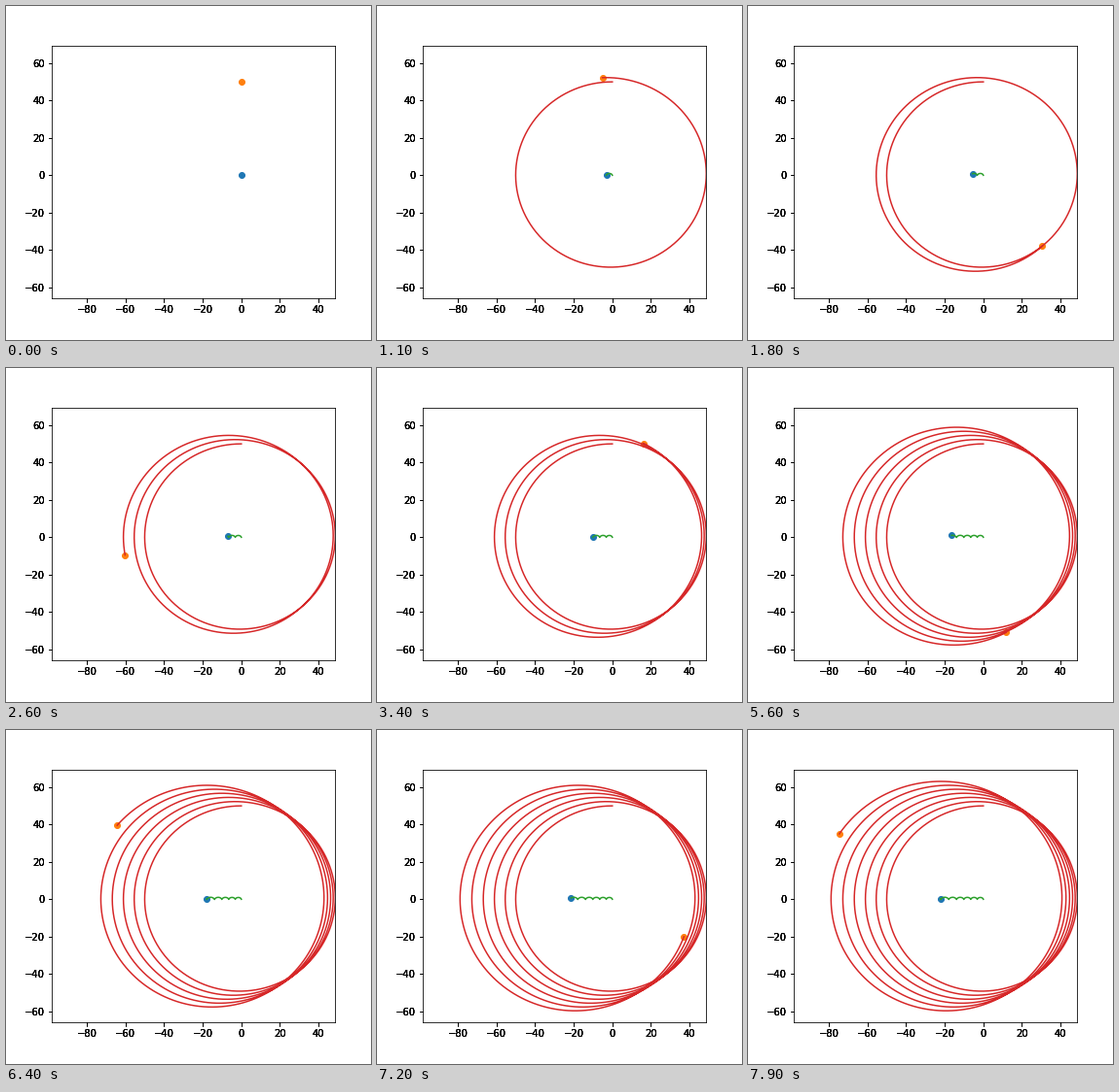
A matplotlib script that plays this animation: 375x344 px, repeating every 8000 ms.

```python
import matplotlib.pyplot as plt
import numpy as np
from matplotlib.animation import FuncAnimation

W, H, DPI = 375, 344, 72
FRAMES, INTERVAL = 80, 100

# Two bodies under gravity (G = 1), heavy one starting at rest
M, m, R = 1000.0, 10.0, 50.0
STEPS = 161              # integration steps per frame
DT = 6.524 / STEPS


def simulate(n):
    """Explicit Euler; its energy gain widens the orbit turn by turn."""
    pos = np.array([[0.0, 0.0], [0.0, R]])
    vel = np.array([[0.0, 0.0], [-np.sqrt(M / R), 0.0]])
    path = np.empty((n + 1, 2, 2))
    path[0] = pos
    for i in range(1, n + 1):
        d = pos[1] - pos[0]
        pull = d / (d @ d) ** 1.5
        acc = np.array([m * pull, -M * pull])
        pos = pos + vel * DT
        vel = vel + acc * DT
        path[i] = pos
    return path


path = simulate(STEPS * (FRAMES - 1))

plt.rcParams.update({"font.family": "DejaVu Sans", "font.size": 10})
fig = plt.figure(figsize=(W / DPI, H / DPI), dpi=DPI, facecolor="white")
BOX = [0.125, 0.125, 0.775, 0.755]


def make_axes(**kw):
    ax = fig.add_axes(BOX, **kw)
    ax.set_xlim(-98.3, 48.27)
    ax.set_ylim(-65.8, 69.15)
    ax.set_xticks(range(-80, 41, 20))
    ax.set_yticks(range(-60, 61, 20))
    return ax


ax = make_axes()
# Stacked copies of the tick labels give them their heavy look
for k in range(3):
    make_axes(frameon=False, label=f"labels{k}")

dots = [ax.plot([], [], "o", color=c, ms=6)[0] for c in ("C0", "C1")]
trails = [ax.plot([], [], color=c, lw=1.5)[0] for c in ("C2", "C3")]


def update(frame):
    end = frame * STEPS
    for b in range(2):
        dots[b].set_data(path[end:end + 1, b, 0], path[end:end + 1, b, 1])
        part = path[:end + 1:7, b] if frame else path[:0, b]
        trails[b].set_data(part[:, 0], part[:, 1])
    return dots + trails


anim = FuncAnimation(fig, update, frames=FRAMES, interval=INTERVAL,
                     init_func=lambda: update(0), repeat=True, repeat_delay=0)
plt.show()
```
